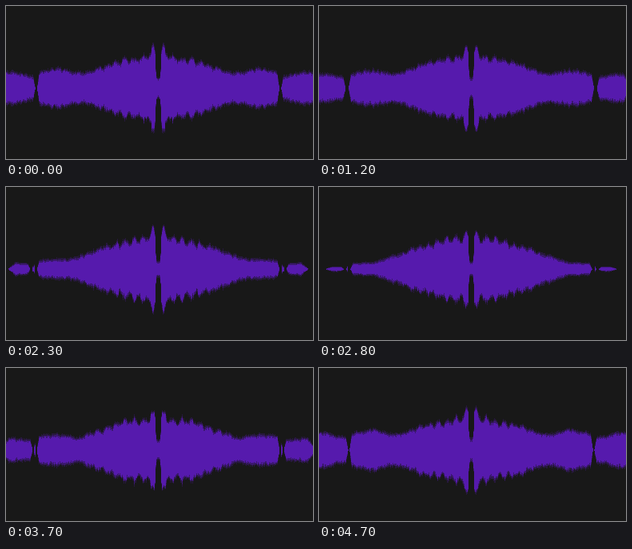
These frames come from a looping animation (384 px wide and 192 px high, 4800 ms). An HTML page with a canvas:

```html
<!DOCTYPE html>
<html lang="en">
<head>
<meta charset="utf-8">
<title>Waveform</title>
<style>
html, body { margin: 0; width: 100%; height: 100%; overflow: hidden; background: #181818; }
canvas { display: block; }
</style>
</head>
<body>
<canvas id="stage" width="384" height="192"></canvas>
<script>
const ctx = document.getElementById('stage').getContext('2d');
const W = 384, H = 192, LOOP = 4800, STEP = 100, MID_X = 190.5, MID_Y = 103;

const mix = (a, b, k) => a + (b - a) * k;
const clamp = v => Math.max(0, Math.min(1, v));
const bell = (x, width) => Math.exp(-((x / width) ** 2));
const random = (a, b) => {
  const v = Math.sin(a * 127.1 + b * 311.7) * 43758.5453;
  return v - Math.floor(v);
};
const smoothNoise = (x, seed) => {
  const i = Math.floor(x);
  return mix(random(i, seed), random(i + 1, seed), x - i);
};

// Loudness of the outer band: a long fade, a quick swell, then a short settling
function loudness(t) {
  if (t < 1200) return mix(21, 19, t / 1200);
  if (t < 3200) return mix(19, 4, (t - 1200) / 2000);
  if (t < 4100) return mix(4, 27, (t - 3200) / 900);
  return mix(27, 21, (t - 4100) / 700);
}

// Half-height of the wave at distance d from the centre
function envelope(d, t) {
  const loud = loudness(t);
  const hump = d < 175 ? 39 * Math.cos(Math.PI * d / 350) ** 2 : 0;
  const swell = loud * (1 + 0.1 * Math.cos((d - 125) / 10));

  const gapAt = 154.5 + 2 * Math.cos(2 * Math.PI * (t - 4100) / 1600);
  const gapWidth = Math.min(4, (24 - loud) / 3);
  const off = Math.abs(d - gapAt);
  const sliver = gapWidth > 2 && off < 1.2 ? 0.5 : 0;
  const open = Math.max(sliver, clamp((off - gapWidth) / 3));

  const outer = Math.max(0, swell - 4) * clamp((172 + 1.5 * loud - d) / 10);
  const body = d > gapAt ? outer : Math.max(hump, swell);
  const notch = 6 + loud / 3 + 0.15 * d ** 4;
  return Math.min(notch, body * open + 10 * bell(d - 6, 3));
}

function bar(x, up, down, alpha) {
  ctx.globalAlpha = alpha;
  ctx.fillRect(x, Math.round(MID_Y - up), 1, Math.round(up + down));
}

function draw(now) {
  const frame = Math.floor(now % LOOP / STEP);
  ctx.globalAlpha = 1;
  ctx.fillStyle = '#181818';
  ctx.fillRect(0, 0, W, H);
  ctx.fillStyle = '#561aad';
  for (let x = 0; x < W; x++) {
    const d = Math.floor(Math.abs(x + 0.5 - MID_X));
    const ripple = 0.07 * Math.cos((d - 7) * Math.PI / 5.75) * clamp((120 - d) / 60);
    const jag = 0.16 * (smoothNoise(d / 3, frame) - 0.5) + 0.1 * (random(d + 300, frame) - 0.5);
    const h = envelope(d, frame * STEP) * (1 + ripple + jag);
    if (h < 0.5) continue;
    const low = h * (1 + 0.08 * (random(d + 900, frame) - 0.5));
    const fuzz = Math.min(h * 0.2, 1 + 2 * random(d + 500, frame));
    bar(x, h + fuzz, low + fuzz, 0.25);
    bar(x, h, low, 0.45);
    bar(x, h - fuzz, low - fuzz, 1);
  }
}

const start = performance.now();
function tick() {
  draw(performance.now() - start);
  requestAnimationFrame(tick);
}
tick();
</script>
</body>
</html>
```
